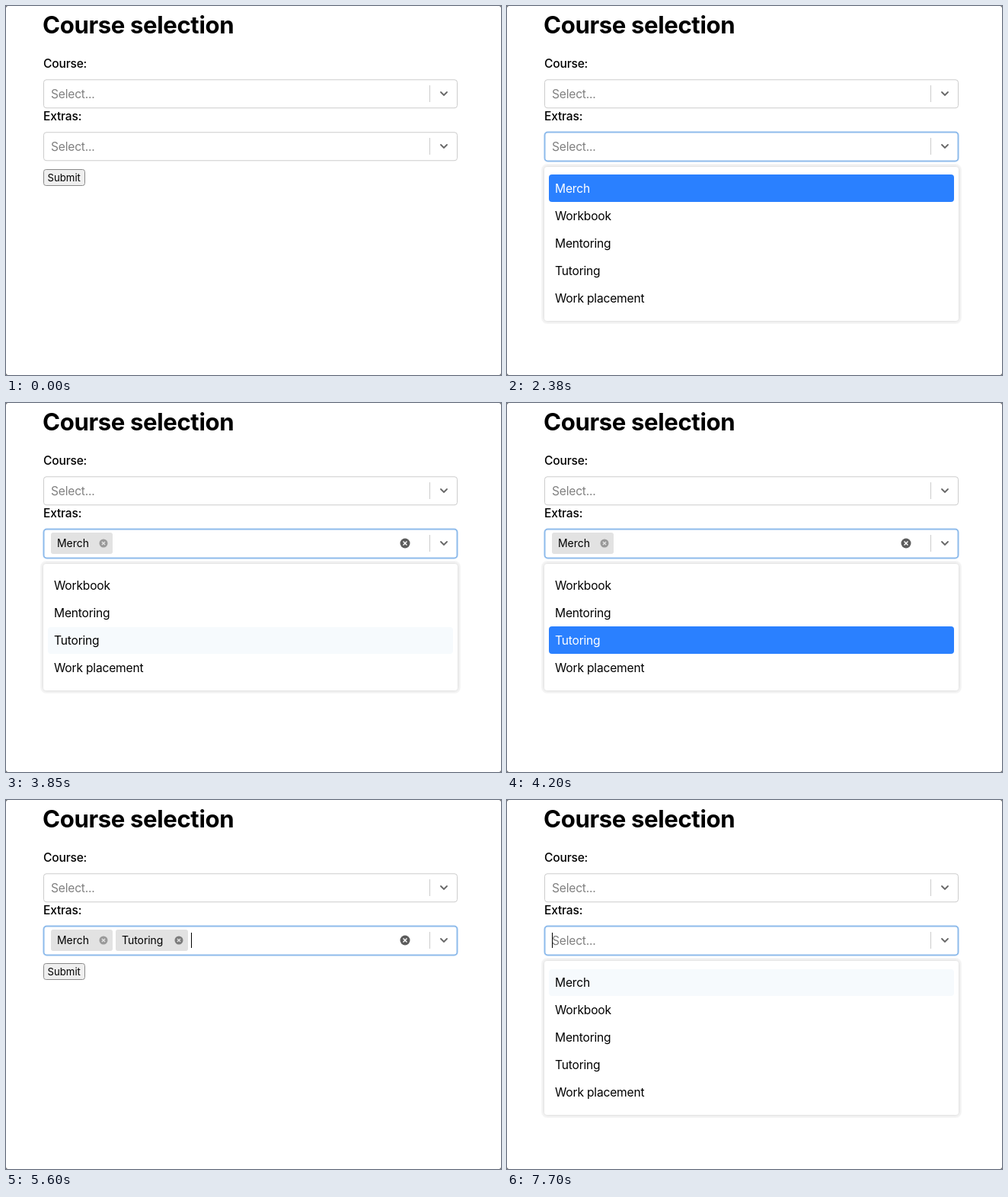
Write an HTML page that moves like this. It is 650 px wide and 484 px high and loops after 8 s.

```html
<!DOCTYPE html>
<html lang="en">
<head>
<meta charset="utf-8">
<title>Course selection</title>
<style>
  html, body { margin: 0; width: 650px; height: 484px; overflow: hidden; background: #fff; }
  svg { display: block; font-family: Inter, sans-serif; }
  .menu { filter: drop-shadow(0 0 2px rgba(0, 0, 0, .16)); }
</style>
</head>
<body>
<svg id="stage" width="650" height="484"></svg>
<script>
const LOOP = 8000;
const OPTIONS = ['Merch', 'Workbook', 'Mentoring', 'Tutoring', 'Work placement'];
const CHIPS = { Merch: { x: 59, width: 81 }, Tutoring: { x: 144, width: 95 } };

// Each step changes only the listed properties.
const START = { focus: false, open: false, caret: false, chips: [], hover: '', pressed: false, hoverRemove: '' };
const STEPS = [
  [1260, { focus: true, open: true, caret: true, hover: 'Merch' }],
  [1890, { caret: false }],
  [2380, { pressed: true }],
  [2450, { open: false, pressed: false, chips: ['Merch'] }],
  [2520, { caret: true }],
  [3080, { open: true, caret: false, hover: 'Tutoring' }],
  [3150, { caret: true }],
  [3780, { caret: false }],
  [4200, { pressed: true }],
  [4340, { open: false, pressed: false, chips: ['Merch', 'Tutoring'] }],
  [4410, { caret: true }],
  [5040, { caret: false }],
  [5600, { caret: true, hoverRemove: 'Tutoring' }],
  [6020, { caret: false, chips: ['Merch'], hoverRemove: '' }],
  [6090, { caret: true }],
  [6580, { hoverRemove: 'Merch' }],
  [6720, { caret: false }],
  [7210, { chips: [], hoverRemove: '' }],
  [7280, { caret: true }],
  [7700, { open: true, hover: 'Merch' }],
];

const text = (x, y, str, { size = 15.6, weight = 400, fill = '#000', spacing = -.2 } = {}) =>
  `<text x="${x}" y="${y}" font-size="${size}" font-weight="${weight}" fill="${fill}" letter-spacing="${spacing}">${str}</text>`;

const box = (x, y, w, h, r, fill, stroke = 'none', line = 1) =>
  `<rect x="${x}" y="${y}" width="${w}" height="${h}" rx="${r}" fill="${fill}" stroke="${stroke}" stroke-width="${line}"/>`;

const cross = (x, y, r, fill, stroke) => {
  const d = r * .38;
  return `<circle cx="${x}" cy="${y}" r="${r}" fill="${fill}"/>
    <path d="M${x - d} ${y - d}l${2 * d} ${2 * d}m0 ${-2 * d}l${-2 * d} ${2 * d}" stroke="${stroke}" stroke-width="1.4"/>`;
};

function control(y, focus, empty) {
  const border = focus ? box(49.5, y + .5, 543, 38, 4, '#fff', '#8ebbeb', 2)
                       : box(49.5, y + .75, 543, 37, 3.5, '#fff', '#ccc');
  return border + (empty ? text(59, y + 25, 'Select...', { fill: '#808080' }) : '') +
    box(556, y + 8, 1, 22, 0, '#ccc') +
    `<path d="M571 ${y + 17}l4 4l4 -4" fill="none" stroke="#666" stroke-width="1.8" stroke-linecap="round"/>`;
}

function chip(name, hovered) {
  const { x, width } = CHIPS[name];
  return box(x, 170, width, 28, 3, '#e2e2e2') +
    text(x + 8, 189, name, { size: 14, spacing: -.05 }) +
    cross(x + width - 12, 184, 5.5, hovered ? '#7c7c7c' : '#999', '#e2e2e2');
}

function menu({ chips, hover, pressed }) {
  const items = OPTIONS.filter(name => !chips.includes(name));
  const height = items.length * 36 + 22;
  return box(45, 207, 552, height + 8, 8, '#f7f7f7') +
    `<g class="menu">${box(49, 211, 544, height, 4, '#fff')}</g>` +
    items.map((name, i) => {
      const y = 221 + i * 36, active = name === hover, blue = active && pressed;
      const row = blue ? box(55, y, 532, 36, 4, '#2a80ff') : active ? box(55, y + 1, 532, 35, 4, '#f6fafd') : '';
      return row + text(63, y + 24, name, { fill: blue ? '#fff' : '#000' });
    }).join('');
}

function submitButton() {
  return box(49.5, 214.5, 54, 21, 3, '#efefef', '#8a8a8a') + text(54.5, 230, 'Submit', { size: 13.2, spacing: 0 });
}

function render(s) {
  const last = CHIPS[s.chips.at(-1)];
  const caretX = last ? last.x + last.width + 4 : 59;
  return text(48, 36, 'Course selection', { size: 31.2, weight: 700, spacing: -.4 }) +
    text(49, 81, 'Course:', { weight: 500 }) +
    control(96, false, true) +
    text(49, 150, 'Extras:', { weight: 500 }) +
    control(165, s.focus, !s.chips.length) +
    s.chips.map(name => chip(name, name === s.hoverRemove)).join('') +
    (last ? cross(524, 184, 6.5, '#5c5c5c', '#fff') : '') +
    (s.caret ? box(caretX, 174, 1, 20, 0, '#000') : '') +
    (s.open ? menu(s) : submitButton()) +
    '<path d="M0 0h2l-2 2zM650 0h-2l2 2zM0 484h2l-2 -2zM650 484h-2l2 -2z" fill="#777"/>';
}

const stage = document.getElementById('stage');
let shown = -1;
function frame(now) {
  const passed = STEPS.filter(([time]) => time <= now % LOOP);
  if (passed.length !== shown) {
    shown = passed.length;
    stage.innerHTML = render(Object.assign({}, START, ...passed.map(([, change]) => change)));
  }
  requestAnimationFrame(frame);
}
frame(performance.now());
</script>
</body>
</html>
```
